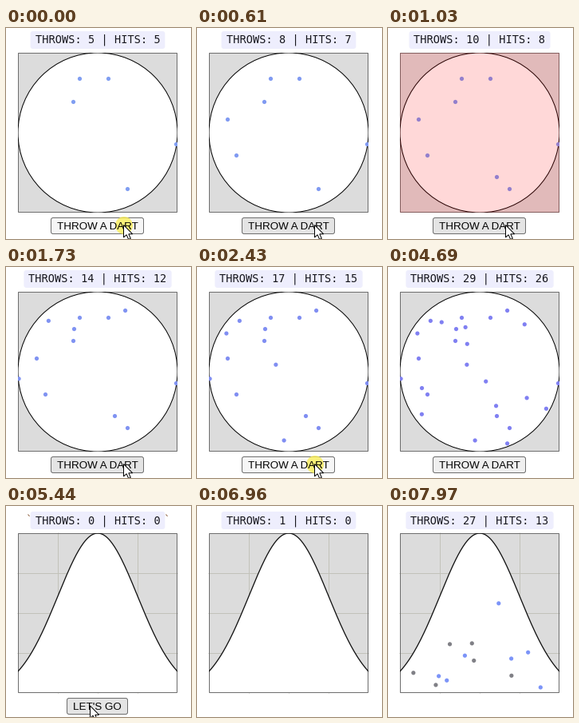
These frames come from a looping animation (232x264 px, 8000 ms). A matplotlib script:

```python
import numpy as np
import matplotlib.pyplot as plt
from matplotlib.animation import FuncAnimation
from matplotlib.lines import Line2D
from matplotlib.patches import Circle, FancyBboxPatch, Polygon, Rectangle
from matplotlib.text import Text
from matplotlib.transforms import Affine2D

W, H, DPI = 232, 264, 64
STEP, LOOP = 20, 8000
PT = 72 / DPI  # points per pixel

fig = plt.figure(figsize=(W / DPI, H / DPI), dpi=DPI, facecolor="white")
PX = Affine2D().scale(1 / W, -1 / H).translate(0, 1) + fig.transFigure

INK, GREY, EDGE, GRID = "#16161c", "#dcdcdc", "#6e6e6e", "#c2c2ba"
BADGE, HOVER, IDLE, PRESSED = "#eeeefd", "#e4e4e4", "#efefef", "#f6f6f6"
MONO, SANS = "DejaVu Sans Mono", "Liberation Sans"
LEFT, SIZE = 15, 200
DISC_TOP, BELL_TOP = 31, 34

FIRST, LAST, MISSES = 6, 29, (7, 10, 21)  # throw numbers
PRESS, FLASH = 75, 295
FADE = (4820, 5400)
RUN = (6960, 7950)
BELL_THROWS = 27


def in_disc(x, y):
    return np.hypot(x - SIZE / 2, y - SIZE / 2) < SIZE / 2


def bell(x):
    """Height of the curve, measured down from the top of the board."""
    return SIZE * (1 - np.exp(-((x - SIZE / 2) / 50) ** 2 / 2))


def under_bell(x, y):
    return y > bell(x)


def scatter(count, inside, rng, points=(), gap=9):
    """Throw darts until enough have hit, keeping them apart."""
    points = list(points)
    while len(points) < count:
        p = rng.uniform(0, SIZE, 2)
        if inside(*p) and all(np.hypot(*(p - q)) > gap for q in points):
            points.append(p)
    return points


rng = np.random.default_rng(12)
OPENING = [(77, 32), (113, 32), (69, 61), (198, 114), (137, 170),
           (23, 83), (34, 128), (121, 155)]
DISC_DARTS = scatter(LAST - len(MISSES), in_disc, rng, OPENING)
BELL_DARTS = scatter(BELL_THROWS // 2, under_bell, rng)
BELL_TINTS = rng.choice(["#7c94f8", "#7c70e2", "#808086"],
                        len(BELL_DARTS), p=[.55, .15, .3])


def px(cls, *args, lw=0, **kw):
    return cls(*args, linewidth=lw * PT, transform=PX, snap=False, **kw)


def board(top, inset=0, **kw):
    side = SIZE - 2 * inset
    return px(Rectangle, (LEFT + inset, top + inset), side, side, **kw)


def rounded(x, y, w, h, r, **kw):
    style = f"round,pad=0,rounding_size={r}"
    return px(FancyBboxPatch, (x, y), w, h, boxstyle=style, **kw)


def label(x, y, s, size, family, color=INK):
    return Text(x, y, s, color=color, fontsize=size * PT, fontfamily=family,
                ha="center", va="baseline", transform=PX)


def badge(throws, hits, top):
    s = f"THROWS: {throws} | HITS: {hits}"
    w = 8.2 * len(s) + 13
    return [rounded(115 - w / 2, top, w, 22, 3, fc=BADGE, ec="none"),
            label(115, top + 15, s, 13.62, MONO)]


def button(s, x, y, w, fill, glow=None):
    parts = [rounded(x + .5, y + .5, w - 1, 20, 2.5, lw=1, fc=fill, ec=EDGE)]
    if glow:
        parts.append(px(Circle, glow, 11, fc="#fbee4e", ec="none", alpha=.75))
    parts.append(label(x + w / 2, y + 15, s, 13.4, SANS, "black"))
    return parts


def cursor(x, y):
    shape = [(0, 0), (0, 15.5), (3.6, 12.2), (6.2, 18), (8.8, 16.8),
             (6.3, 11.3), (11.2, 11.3)]
    return px(Polygon, np.add(shape, (x, y)), lw=1, fc="white", ec="black")


def clipped(art, top):
    art.set_clip_path(board(top))
    return art


def dot(point, color, top):
    center = (LEFT + point[0] + .5, top + point[1] + .5)
    return clipped(px(Circle, center, 2.6, fc=color, ec="none"), top)


def border(top):
    return board(top, .5, lw=1, fc="none", ec=EDGE)


def throw_time(n):
    """Clicks that slowly speed up."""
    k = n - FIRST
    return 70 + 210 * k - .8 * k * k


def disc_scene(t):
    n = FIRST - 1 + sum(throw_time(k) <= t for k in range(FIRST, LAST + 1))
    hits = n - sum(m <= n for m in MISSES)
    pressed = n < LAST and t >= throw_time(n + 1) - PRESS

    parts = badge(n, hits, 4)
    ring = px(Circle, (LEFT + SIZE / 2, DISC_TOP + SIZE / 2), SIZE / 2,
              lw=1, fc="white", ec="black")
    parts += [board(DISC_TOP, fc=GREY, ec="none"), border(DISC_TOP),
              clipped(ring, DISC_TOP)]
    tint = (.5, np.interp(t, [0, 4690], [.62, .5]), .95)
    parts += [dot(p, tint, DISC_TOP) for p in DISC_DARTS[:hits]]

    ages = [t - throw_time(m) for m in MISSES]
    red = max([.26 * (1 - a / FLASH) for a in ages if 0 <= a < FLASH], default=0)
    if red > 0:
        parts.append(board(DISC_TOP, fc="red", ec="none", alpha=red))

    tip = np.interp(t, [4500, 4640], [246.5, H + 3])
    fill = PRESSED if pressed else HOVER if tip < 258 else IDLE
    parts += button("THROW A DART", 56, 237, 117, fill,
                    (148, 247) if pressed else None)
    parts.append(cursor(147.5, tip))
    return parts


def bell_scene(t):
    running = t >= RUN[0]
    n = int(np.interp(t, RUN, (1, BELL_THROWS))) if running else 0
    hits = n // 2

    parts = badge(n, hits, 7)
    if not running:
        parts += [label(x, 22, "`", 13.62, MONO, "#8a5a3a") for x in (28, 201)]

    x = np.linspace(0, SIZE, 201)
    y = BELL_TOP + bell(x)
    bottom = BELL_TOP + SIZE
    parts.append(board(BELL_TOP, fc=GREY, ec="none"))
    for k in range(50, SIZE, 50):
        gx, gy = LEFT + k + .5, BELL_TOP + k + .5
        parts += [px(Line2D, [gx, gx], [BELL_TOP, bottom], lw=1, color=GRID),
                  px(Line2D, [LEFT, LEFT + SIZE], [gy, gy], lw=1, color=GRID)]
    area = np.column_stack([np.r_[0, x, SIZE] + LEFT, np.r_[bottom, y, bottom]])
    parts += [px(Polygon, area, fc="white", ec="none"), border(BELL_TOP),
              clipped(px(Line2D, LEFT + x, y, lw=1.3, color="#111111"), BELL_TOP)]
    parts += [dot(p, c, BELL_TOP)
              for p, c in zip(BELL_DARTS[:hits], BELL_TINTS)]

    if not running:
        parts += button("LET'S GO", 76, 240, 77, HOVER)
        parts.append(cursor(105.5, 250))
    return parts


def show(parts, fade=1):
    for p in parts:
        if fade < 1:
            a = p.get_alpha()
            p.set_alpha(fade * (1 if a is None else a))
        p.set_zorder(len(fig.artists))
        fig.add_artist(p)


def draw(i):
    t = i * STEP
    fig.clear()
    fade = float(np.interp(t, FADE, (0, 1)))
    if fade < 1:
        show(disc_scene(t))
    if fade > 0:
        sheet = px(Rectangle, (0, 0), W, H, fc="white", ec="none")
        show([sheet] + bell_scene(t), fade)
    return []


anim = FuncAnimation(fig, draw, frames=LOOP // STEP, interval=STEP,
                     init_func=lambda: [], repeat=True, repeat_delay=0)
plt.show()
```
